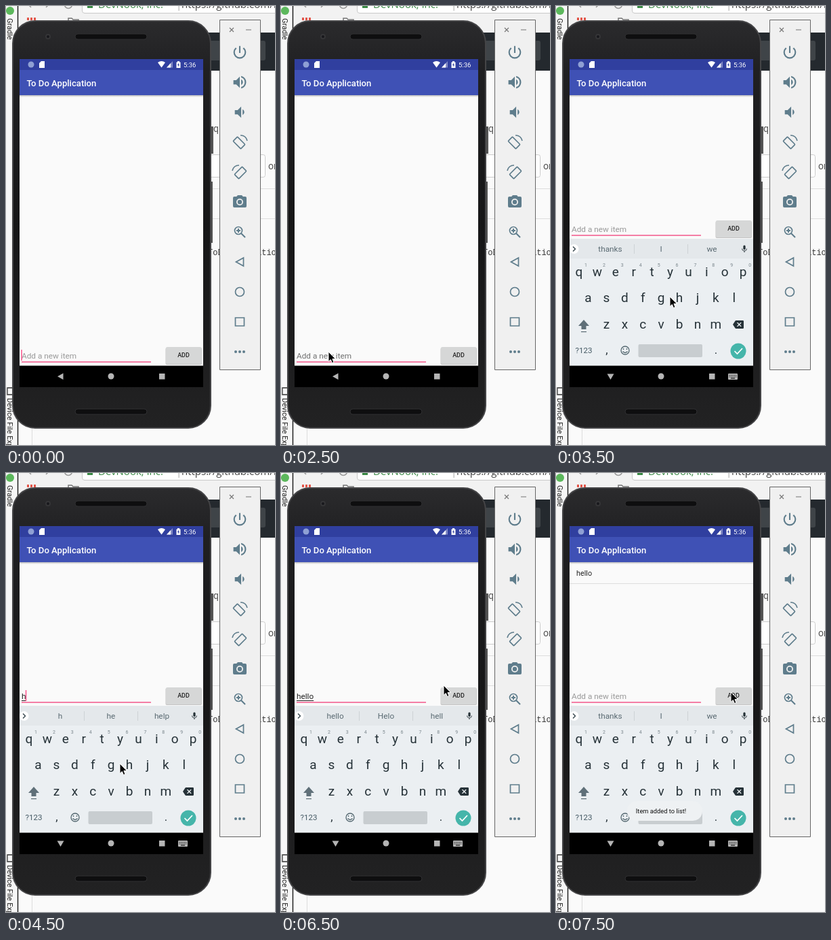
Write an HTML page that moves like this. It is 397x645 px and loops after 8 s.

```html
<!DOCTYPE html>
<html lang="en">
<head>
<meta charset="utf-8">
<title>To Do Application</title>
<style>
  html, body { margin: 0; width: 100%; height: 100%; overflow: hidden; background: #fafafa; }
  svg { display: block; width: 397px; height: 645px; font-family: Roboto, sans-serif; }
  .mid { text-anchor: middle; }
  .line { fill: none; stroke: #5f7d8c; stroke-width: 1.7; }
</style>
</head>
<body>
<svg viewBox="0 0 397 645">
  <defs>
    <linearGradient id="shell" x2="0" y2="1">
      <stop offset="0" stop-color="#2b2b2d"/><stop offset=".12" stop-color="#202022"/>
      <stop offset=".5" stop-color="#161617"/><stop offset="1" stop-color="#222223"/>
    </linearGradient>
    <linearGradient id="shade" x2="0" y2="1">
      <stop offset="0" stop-color="#bbb"/><stop offset="1" stop-color="#fafafa"/>
    </linearGradient>
    <clipPath id="screen"><path d="M20 78H291V560H20Z"/></clipPath>
  </defs>

  <!-- Browser behind the phone -->
  <path fill="#fafafa" d="M0 0H397V645H0Z"/>
  <path fill="#f2f2f2" d="M18 0H397V39H18Z"/>
  <path fill="#fff" stroke="#c8c8c8" d="M112.500 -5V7Q112.500 10.500 116 10.500H400V-5"/>
  <g fill="none" stroke="#999" stroke-width="1.5">
    <path d="M37 2L32 -3M59 2L64 -3"/><circle cx="92" cy="-2" r="5.500"/>
    <path stroke="#777" d="M92 24V18H97L99 20H107V24"/>
  </g>
  <path fill="#e2574c" d="M31 17h3v4h-3zm5 0h3v4h-3zm5 0h3v4h-3z"/>
  <path fill="#3b8a46" d="M120 -4H128V3H120Z"/>
  <g font-family="Open Sans, sans-serif" font-size="15">
    <text x="136" y="3" fill="#3b8a46">DevNook, Inc.</text>
    <text x="251" y="3" fill="#aaa">|</text>
    <text x="259" y="3" fill="#444">https://github.com/Me</text>
  </g>
  <path fill="#24292e" d="M290 39H397V95H290Z"/>
  <rect x="290" y="51" width="93" height="29" rx="3" fill="#3f4448"/>
  <g fill="none" stroke="#ddd">
    <path d="M290 268.500H397M290 312.500H397M38.500 600V645"/>
    <rect x="290.500" y="218.500" width="92" height="33" rx="3" fill="#fff" stroke="#ccc"/>
  </g>
  <g font-size="14" fill="#555"><text x="306" y="185">q</text><text x="387" y="240">or</text></g>
  <text x="298" y="366" font-family="Liberation Mono, monospace" font-size="12" fill="#333">ToDoApplication</text>

  <!-- Tool strip on the left -->
  <path fill="#f6f6f6" d="M0 0H17V645H0Z"/>
  <path stroke="#222" stroke-width="1.500" d="M17.500 0V645"/>
  <circle cx="6" cy="7" r="6" fill="#5cb85c"/>
  <g font-size="11" fill="#222">
    <text transform="translate(2 18) rotate(90)">Gradle</text>
    <text transform="translate(2 576) rotate(90)">Device File Explorer</text>
  </g>
  <path fill="none" stroke="#333" stroke-width="1.300" d="M9 561H2V571H9"/>

  <!-- Emulator controls -->
  <path fill="#f0f0f0" stroke="#666" d="M315.500 20.500H375.500V534.500H315.500Z"/>
  <path fill="none" stroke="#777" stroke-width="1.200" d="M330 32l6 6m0-6l-6 6M354 35h8"/>
  <g id="controls" fill="#5f7d8c"></g>
  <g class="line">
    <rect x="-4.500" y="-8" width="9" height="16" rx="1" transform="translate(344 201) rotate(-45)"/>
    <path d="M346 190Q354 190 356 198"/>
    <rect x="-4.500" y="-8" width="9" height="16" rx="1" transform="translate(346 245) rotate(45)"/>
    <path d="M344 234Q336 234 334 242"/>
    <circle cx="343" cy="330" r="5.500"/><path d="M347 334L353 340M340 330H346M343 327V333" stroke-width="2"/>
    <path d="M350.500 370V382L339.500 376Z"/>
    <circle cx="345" cy="420" r="6.500"/><path d="M338.500 458H351.500V470H338.500Z"/>
  </g>
  <g fill="#5f7d8c"><circle cx="339" cy="508" r="2"/><circle cx="345" cy="508" r="2"/><circle cx="351" cy="508" r="2"/></g>

  <!-- Phone -->
  <path fill="#555" d="M301 177H306V217H301ZM301 258H305V348H301Z"/>
  <rect x="10" y="22" width="292" height="598" rx="33" fill="url(#shell)" stroke="#454547" stroke-width="2"/>
  <circle cx="62" cy="45" r="4" fill="#353537"/><circle cx="62" cy="45" r="2" fill="#17171c"/>
  <g fill="#0e0e0f" stroke="#303032">
    <rect x="102" y="41" width="106" height="8" rx="4"/><rect x="102" y="592" width="106" height="8" rx="4"/>
  </g>

  <g clip-path="url(#screen)">
    <path fill="#fafafa" d="M20 78H291V560H20Z"/>
    <path fill="url(#shade)" d="M20 131H291V134H20Z"/>
    <path fill="#303f9f" d="M20 78H291V94H20Z"/><path fill="#3f51b5" d="M20 94H291V131H20Z"/>
    <circle cx="37" cy="86" r="4.500" fill="#8fa0d4"/>
    <g fill="#fff">
      <path d="M52 81H57V91H49V84ZM224 83Q229.500 79 235 83L229.500 90.500ZM251.500 82.500H253V81H256V82.500H257.500V91H251.500Z"/>
      <path opacity=".4" d="M246 81V90.500H237Z"/><path d="M243 84V90.500H237Z"/>
      <path fill="#303f9f" d="M255 83.500L253 87H254.300V89.500L256 86.300H255Z"/>
      <text x="262" y="90" font-size="9.500">5:36</text>
      <text x="30.500" y="117.500" font-size="13.100" font-weight="500">To Do Application</text>
    </g>
    <g id="item">
      <text x="30" y="151" font-size="10.800" fill="#222">hello</text>
      <path stroke="#ddd" d="M20 162.500H291"/>
    </g>

    <g id="row">
      <text id="entry" x="23" y="518" font-size="11.800"></text>
      <path id="under" stroke="#222" d="M23 520.500H48"/>
      <path stroke="#f2568a" stroke-width="1.400" d="M23 523H214"/>
      <path id="caret" stroke="#ff4081" stroke-width="1.300" d="M0 505V521"/>
      <rect x="235.500" y="502" width="53.500" height="25" rx="2" fill="#c4c4c4"/>
      <rect id="button" x="236" y="501" width="52.500" height="25" rx="2"/>
      <text class="mid" x="262" y="516" font-size="9" font-weight="500" fill="#222">ADD</text>
    </g>

    <g id="keyboard">
      <path fill="#ebeff2" d="M20 342H291V528H20Z"/><path fill="#e4e8eb" d="M20 342H291V371H20Z"/>
      <circle cx="26.500" cy="357" r="7" fill="#fff"/>
      <path fill="none" stroke="#37474f" stroke-width="1.400" d="M25 353.500L28.500 357L25 360.500"/>
      <path stroke="#cdd2d5" d="M115.500 350V364M194.500 350V364"/>
      <g id="words" class="mid" font-size="11.800" fill="#5a6a72">
        <text x="80" y="361"></text><text x="155" y="361"></text><text x="230" y="361"></text>
      </g>
      <g id="keys" class="mid" fill="#263238"></g>
      <path fill="#607079" d="M41 461L49 470H44.500V475H37.500V470H33ZM37 478H45V479.200H37Z"/>
      <text class="mid" x="41" y="510" font-size="11.500" fill="#455a64">?123</text>
      <g fill="none" stroke="#546870" stroke-width="1.300">
        <circle cx="102" cy="506" r="6"/><path d="M98.500 507.500Q102 511.500 105.500 507.500M99.500 503V505M104.500 503V505"/>
      </g>
      <rect x="121.500" y="497" width="94.500" height="19" rx="2" fill="#c8cdd0"/>
      <circle cx="269" cy="507" r="11.500" fill="#45b5aa"/>
      <path fill="none" stroke="#fff" stroke-width="1.700" d="M263.500 507L267.500 511L275 503"/>
    </g>

    <path d="M20 528.500H291V560H20Z"/>
    <g fill="#b5b5b5">
      <path id="back"/><circle cx="155" cy="544" r="4.500"/><path d="M226 540H234.500V548.500H226Z"/>
      <g id="switcher">
        <rect x="254" y="540" width="14" height="9" rx="1"/>
        <path stroke="#000" stroke-dasharray="1.200 1.200" d="M255.500 542.500H267M255.500 544.800H267"/>
        <path stroke="#000" d="M258 547H264"/>
      </g>
    </g>
    <g id="toast">
      <rect x="105" y="482" width="111" height="29" rx="14" fill="#eef1f3"/>
      <text class="mid" x="155" y="499.500" font-size="9.300" fill="#111">Item added to list!</text>
    </g>
  </g>
  <path id="pointer" stroke="#fff" d="M0 0V14.500L3.300 11.500L5.500 16.500L8 15.500L5.900 10.600H10.500Z"/>
</svg>

<script>
const $ = id => document.getElementById(id);
const show = (id, opacity) => $(id).setAttribute('opacity', +opacity);
const move = (id, x, y) => $(id).setAttribute('transform', `translate(${x} ${y})`);

const icon = (x, y, size, d) =>
  `<path transform="translate(${x} ${y}) scale(${size / 24}) translate(-12 -12)" d="${d}"/>`;

$('controls').innerHTML =
  icon(345, 68, 25, 'M13 3h-2v10h2zm4.800 2.200l-1.400 1.400A7 7 0 1 1 7.600 6.600L6.200 5.200A9 9 0 1 0 17.800 5.200z') +
  icon(345, 112, 25, 'M3 9v6h4l5 5V4L7 9zm13.500 3A4.500 4.500 0 0 0 14 8v8a4.500 4.500 0 0 0 2.500-4zM14 3.200v2.100a7 7 0 0 1 0 13.400v2.100a9 9 0 0 0 0-17.600z') +
  icon(345, 156, 25, 'M18.500 12A4.500 4.500 0 0 0 16 8v8a4.500 4.500 0 0 0 2.500-4zM5 9v6h4l5 5V4L9 9z') +
  icon(345, 288, 24, 'M9 2L7.200 4H4a2 2 0 0 0-2 2v12a2 2 0 0 0 2 2h16a2 2 0 0 0 2-2V6a2 2 0 0 0-2-2h-3.200L15 2zM12 17a5 5 0 1 1 0-10a5 5 0 1 1 0 10zM12 15.200a3.200 3.200 0 1 0 0-6.400a3.200 3.200 0 1 0 0 6.400z');

const label = (char, x, y, size, fill = '') =>
  `<text x="${x}" y="${y}" font-size="${size}" ${fill}>${char}</text>`;
const keyRow = (chars, x, y) =>
  [...chars].map((char, i) => label(char, x + i * 26.9, y, 19)).join('');

$('keys').innerHTML =
  keyRow('qwertyuiop', 34, 397) + keyRow('asdfghjkl', 47.500, 435) + keyRow('zxcvbnm', 74.500, 474) +
  [...'1234567890'].map((n, i) => label(n, 44 + i * 26.9, 383, 7, 'fill="#7a868c"')).join('') +
  label(',', 75, 511, 17) + label('.', 236, 511, 17) +
  icon(278, 357, 13, 'M12 14a3 3 0 0 0 3-3V5a3 3 0 0 0-6 0v6a3 3 0 0 0 3 3zm5.300-3a5.300 5.300 0 0 1-10.600 0H5a7 7 0 0 0 6 6.700V21h2v-3.300A7 7 0 0 0 19 11z') +
  icon(269, 468, 16, 'M22 3H7L5.400 3.900L0 12l5.400 8.100L7 21h15a2 2 0 0 0 2-2V5a2 2 0 0 0-2-2zm-3 12.600L17.600 17L14 13.400L10.400 17L9 15.600L12.600 12L9 8.400L10.400 7L14 10.600L17.600 7L19 8.400L15.400 12z');

// Pointer route: time, x, y
const route = [
  [500, 212, 590], [750, 150, 540], [1000, 107, 512], [1500, 80, 511], [1750, 80, 511], [2250, 70, 508],
  [2750, 70, 508], [3500, 168, 427], [5500, 168, 427], [6500, 240, 312], [7000, 258, 322], [8000, 258, 322]
];

function pointerAt(t) {
  const i = Math.max(1, route.findIndex(stop => stop[0] > t));
  const [t0, x0, y0] = route[i - 1], [t1, x1, y1] = route[i];
  const k = Math.max(0, (t - t0) / (t1 - t0));
  return [x0 + (x1 - x0) * k, y0 + (y1 - y0) * k];
}

function draw(now) {
  const t = Math.floor(now % 8000 / 250) * 250;
  const open = t >= 2750, added = t >= 7250;
  const typed = t < 4500 || added ? '' : 'hello'.slice(0, 1 + (t - 4500) / 125);
  const full = typed === 'hello';

  $('entry').textContent = typed || 'Add a new item';
  $('entry').setAttribute('fill', typed ? '#222' : t === 2500 ? '#707070' : '#999');
  const width = typed ? $('entry').getComputedTextLength() : 0;
  $('under').setAttribute('d', `M23 520.500h${width}`);
  show('under', typed);
  move('caret', 23 + width, 0);
  show('caret', t % 1000 < 500 || (typed && !full));
  move('row', 0, open ? -186 : 0);
  $('button').setAttribute('fill', t === 7000 ? '#bfc0c0' : '#d6d7d7');

  const words = full ? ['hello', 'Helo', 'hell'] : typed ? [typed, 'he', 'help'] : ['thanks', 'I', 'we'];
  [...$('words').children].forEach((node, i) => node.textContent = words[i]);
  show('keyboard', open);
  move('keyboard', 0, t === 2750 ? 50 : 0);
  show('switcher', open);
  $('back').setAttribute('d', open ? 'M75.500 540.500H85.500L80.500 549Z' : 'M84.500 539.500V549L76 544.200Z');

  show('item', added);
  show('toast', added ? (t === 7250 ? 0.3 : 1) : 0);
  show('pointer', t >= 500);
  move('pointer', ...pointerAt(t));
  requestAnimationFrame(() => draw(performance.now()));
}
show('under', 0);
draw(0);
</script>
</body>
</html>
```
